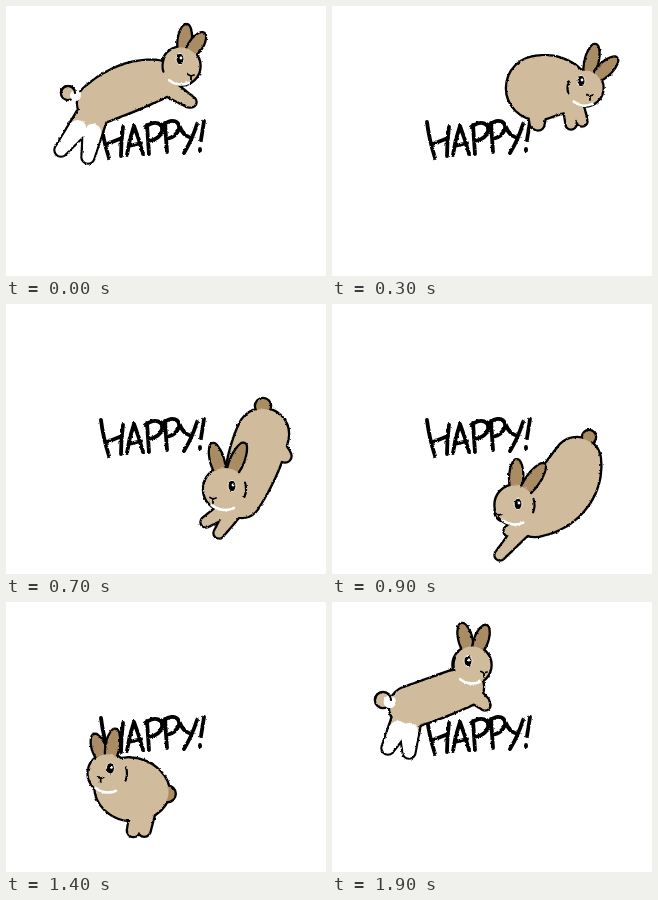
Recreate the animation shown at these times as an HTML page. Size 320 by 270 pixels, loop 2 s.

```html
<!DOCTYPE html>
<html lang="en">
<head>
<meta charset="utf-8">
<title>Happy rabbit</title>
<style>
  html, body { margin: 0; width: 100%; height: 100%; overflow: hidden; background: #fff; }
  svg { display: block; width: 100%; height: 100%; }
  path { stroke-linecap: round; stroke-linejoin: round; }
</style>
</head>
<body>
<svg viewBox="0 0 320 270" role="img" aria-label="HAPPY!">
  <defs>
    <filter id="rough" filterUnits="userSpaceOnUse" x="0" y="0" width="320" height="270" color-interpolation-filters="sRGB">
      <feTurbulence type="fractalNoise" baseFrequency=".35" numOctaves="2" seed="4"/>
      <feDisplacementMap in="SourceGraphic" scale="2.4" xChannelSelector="R" yChannelSelector="G"/>
    </filter>
  </defs>
  <g filter="url(#rough)">
    <path fill="none" stroke="#000" stroke-width="3.8" d="M95 116Q97 133 103 152M117 121Q115 135 115 150M101 138L116 132
      M121 149Q123 134 128 120Q133 133 137 148M123 140L135 137
      M141 119L143 148M139 121C150 113 157 118 156 125Q154 133 143 135
      M159 117L161 146M157 119C167 111 174 116 173 123Q170 131 161 133
      M174 121Q177 129 183 131M191 118Q186 134 178 147M198 115L195 134M194 143L194 144.5"/>
    <g id="rabbit"></g>
  </g>
</svg>
<script>
const TAN = '#d0bc9c', BROWN = '#a98c63', WHITE = '#fff', INK = '#000', NAPE = '#f5d596';
const STEP = 100, COUNT = 20;

// Key poses. Spine runs neck, middle, rump as [x, y, radius]; ears, legs and
// arms are given by their tips only. `back` is 1 when seen from behind.
const poses = [
  { at: 0, spine: [[150, 74, 19], [122, 82, 23], [92, 97, 20]], head: [175, 60, 18.5],
    ears: [[181, 17], [199, 26]], eye: [174, 53], nose: [185, 70],
    legs: [[55, 144], [82, 151]], arms: [[185, 96], [183, 96]], tail: [62, 87, 6], back: 1 },
  { at: 3, spine: [[238, 84, 21], [222, 80, 28], [206, 82, 31]], head: [253, 82, 17.5],
    ears: [[264, 37], [286, 51]], eye: [249, 75], nose: [258, 90],
    legs: [[206, 118], [204, 117]], arms: [[239, 118], [250, 115]], tail: [190, 80, 4], back: 0 },
  { at: 7, spine: [[236, 195, 18], [247, 160, 25], [257, 130, 25]], head: [219, 185, 21],
    ears: [[206, 138], [239, 138]], eye: [226, 182], nose: [207, 195],
    legs: [[279, 152], [278, 150]], arms: [[200, 218], [213, 229]], tail: [257, 102, 7], back: 0 },
  { at: 9, spine: [[203, 211, 21], [230, 187, 29], [245, 157, 23]], head: [183, 201, 19.5],
    ears: [[185, 154], [213, 159]], eye: [186, 200], nose: [167, 211],
    legs: [[258, 178], [256, 176]], arms: [[177, 227], [168, 251]], tail: [257, 133, 6], back: 0 },
  { at: 12, spine: [[130, 215, 23], [150, 207, 31], [172, 199, 22]], head: [112, 206, 20],
    ears: [[107, 163], [125, 160]], eye: [110, 204], nose: [93, 215],
    legs: [[165, 244], [163, 243]], arms: [[145, 244], [124, 236]], tail: [197, 209, 6], back: 0 },
  { at: 16, spine: [[78, 122, 22], [75, 148, 30], [77, 170, 22]], head: [81, 101, 17.5],
    ears: [[48, 66], [79, 56]], eye: [93, 90], nose: [98, 98],
    legs: [[51, 197], [88, 198]], arms: [[85, 118], [85, 118]], tail: [89, 157, 10], back: 1 },
  { at: 19, spine: [[132, 85, 19], [106, 95, 20], [78, 105, 20]], head: [140, 63, 18.5],
    ears: [[129, 20], [155, 22]], eye: [136, 59], nose: [152, 71],
    legs: [[56, 146], [77, 150]], arms: [[153, 103], [152, 100]], tail: [51, 98, 7], back: 1 }
];

const rabbit = document.getElementById('rabbit');

const mix = (a, b, u) => Array.isArray(a) ? a.map((v, i) => mix(v, b[i], u)) : a + (b - a) * u;
const toward = (a, b, dist) => {
  const len = Math.hypot(b[0] - a[0], b[1] - a[1]) || 1;
  return mix(a.slice(0, 2), b, dist / len);
};

const disc = (x, y, r) => `M${x - r} ${y}a${r} ${r} 0 1 1 ${2 * r} 0a${r} ${r} 0 1 1 ${-2 * r} 0Z`;

// Discs strung along the parabola through three [x, y, radius] points.
function chain(a, b, c, start = 0) {
  const steps = 24;
  let d = '';
  for (let i = 0; i <= steps; i++) {
    const t = start + (1 - start) * i / steps;
    const at = k => a[k] * (1 - t) * (1 - 2 * t) + b[k] * 4 * t * (1 - t) + c[k] * t * (2 * t - 1);
    d += disc(at(0), at(1), at(2));
  }
  return d;
}

const limb = (from, tip, r0, r1, start) => {
  const a = [from[0], from[1], r0], c = [tip[0], tip[1], r1];
  return chain(a, mix(a, c, .5), c, start);
};

function ear(head, tip) {
  const base = toward(head, tip, 15), end = toward(tip, head, 5);
  return chain([...base, 4], [...mix(base, end, .55), 6], [...end, 2.8]);
}

function arc([x, y], r, from, to) {
  const point = deg => [x + r * Math.cos(deg * Math.PI / 180), y + r * Math.sin(deg * Math.PI / 180)];
  return `M${point(from)}A${r} ${r} 0 0 1 ${point(to)}`;
}

const fill = (d, color) => `<path d="${d}" fill="${color}"/>`;
const line = (d, color, width) => `<path d="${d}" fill="none" stroke="${color}" stroke-width="${width}"/>`;
const inked = (d, color) => line(d, INK, 4.6) + fill(d, color);

function draw(frame) {
  const i = poses.findLastIndex(p => p.at <= frame);
  const from = poses[i], to = poses[i + 1] || from;
  const u = ((frame - from.at) / (to.at - from.at || 1)) ** 1.6;
  const p = {};
  for (const key in from) p[key] = mix(from[key], to[key], u);

  const { spine, head, eye, nose, tail } = p;
  const [neck, , rump] = spine;
  const behind = p.back > .5;
  const muzzle = mix(head.slice(0, 2), nose, .65);
  const side = nose[0] > head[0] ? 180 : 0;

  const face = disc(...head) + disc(...muzzle, 9);
  const legs = p.legs.map(tip => limb(rump, tip, 13, 5.5)).join('');
  const arms = p.arms.map(tip => limb(neck, tip, 9, 4.5)).join('');
  const coat = chain(...spine) + legs + arms;

  // All ink goes below all fills, so only the joint silhouette stays outlined.
  let out = line(coat + face + disc(...tail), INK, 4.6) + fill(disc(...tail), behind ? TAN : BROWN) + fill(coat, TAN);
  if (behind) {
    out += fill(p.legs.map(tip => limb(rump, tip, 13, 5.5, .55)).join(''), WHITE);
    out += fill(disc(...mix(tail.slice(0, 2), rump, .25), tail[2] * .9), WHITE);
  }
  out += line(arc(tail, tail[2] + 1, 180, 360), INK, behind ? 2.2 : 0);
  out += p.ears.map(tip => inked(ear(head, tip), BROWN)).join('') + fill(face, TAN);
  if (behind && side && nose[1] < head[1]) out += fill(disc(head[0] - 12, head[1] - 3, 7), NAPE);

  out += line(arc(head, head[2], 65, 130), WHITE, 2.6);
  out += line(arc(head, head[2], side - 18, side + 22), INK, 2.2);
  out += line(`M${nose}l-3 -1.5M${nose}l3 -1M${nose}l0 4`, INK, 1.8);
  const [x, y] = eye;
  out += `<ellipse cx="${x}" cy="${y}" rx="4" ry="5.6" fill="${INK}" stroke="#f4ecdd"/>`;
  out += fill(disc(x + 1, y - 1, 1.4), WHITE);
  rabbit.innerHTML = out;
}

let shown = -1;
function tick() {
  const frame = Math.floor(performance.now() / STEP) % COUNT;
  if (frame !== shown) draw(shown = frame);
  requestAnimationFrame(tick);
}
tick();
</script>
</body>
</html>
```
